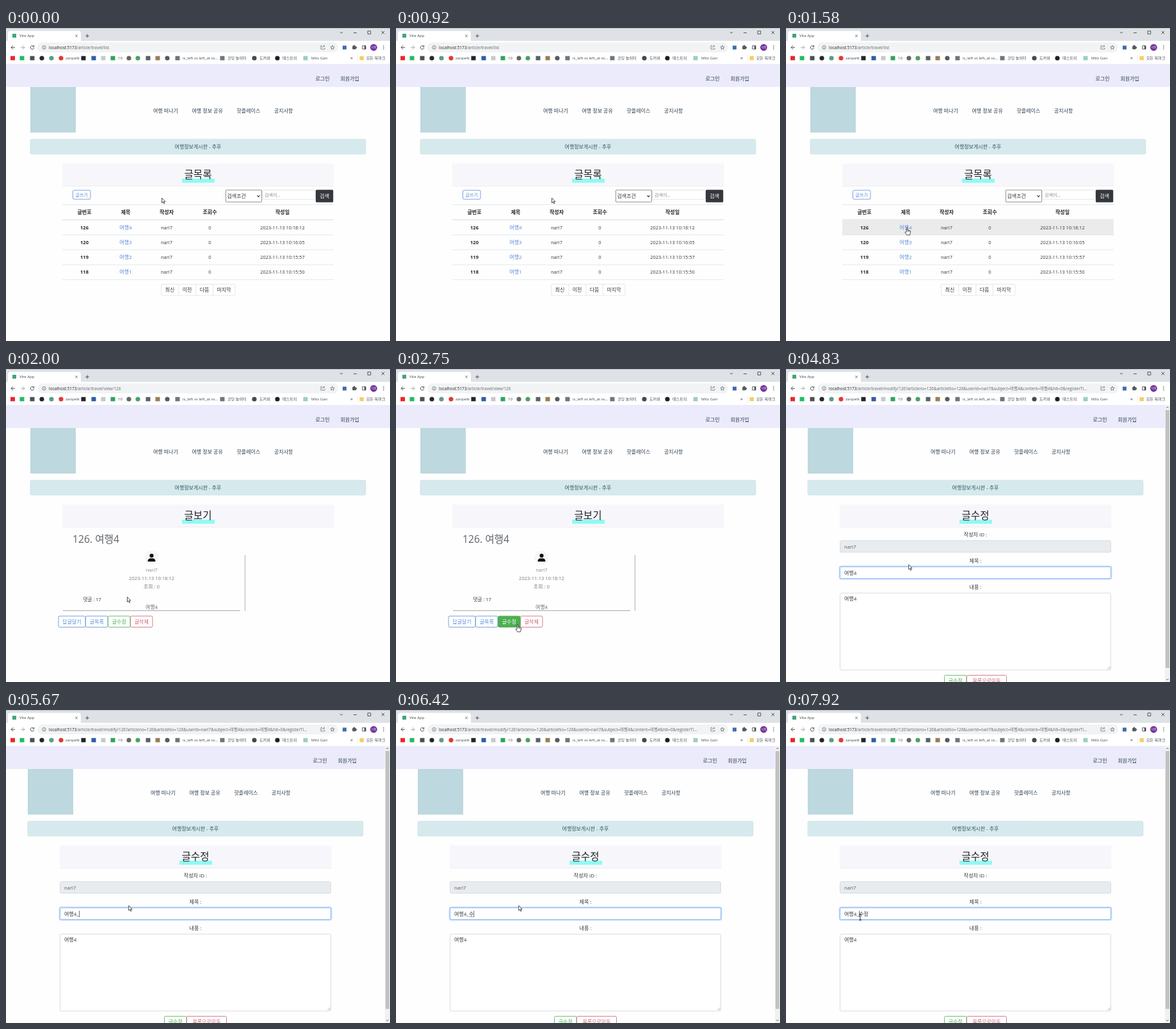
Write an HTML page with a canvas that moves like this. It is 600 by 488 pixels and loops after 8000 ms.

```html
<!DOCTYPE html>
<html lang="ko">
<head>
<meta charset="utf-8">
<title>Vite App</title>
<style>
html, body { margin: 0; width: 100%; height: 100%; overflow: hidden; background: #fff; }
canvas { display: block; width: 600px; height: 488px; }
</style>
</head>
<body>
<canvas id="stage"></canvas>
<script>
const W = 600, H = 488, LOOP = 8000;
const FONT = '"Open Sans", "Noto Sans CJK KR", "Noto Sans CJK", "Noto Sans CJK JP", sans-serif';
const USER = 'nari7', INK = '#34383e', LINE = '#dee2e6';
const BLUE = '#5b8bd6', GREEN = '#4caf50', RED = '#cc6070';

const VIEW_AT = 1670, EDIT_AT = 2920, FOCUS_AT = 4330, CARET_AT = 7920;

// time, x, y of the pointer's hot spot
const PATH = [
  [0, 243.5, 265], [920, 243.5, 265], [1500, 189, 311], [1750, 189, 311],
  [2250, 190, 398], [2920, 190, 398], [3500, 198, 298], [3750, 198, 298],
  [4170, 188, 316], [4330, 188, 316], [4580, 191.7, 305], [6900, 191.7, 305],
  [7500, 124, 326], [7670, 122, 328], [7900, 122, 328], [7915, 116, 323], [8000, 116, 323]
];
const TYPED = [[0, '여행4'], [5330, '여행4_'], [6170, '여행4_ㅅ'], [6250, '여행4_수'],
  [6500, '여행4_숮'], [6580, '여행4_수정']];

const canvas = document.getElementById('stage');
const c = canvas.getContext('2d');
const dpr = window.devicePixelRatio || 1;
canvas.width = W * dpr;
canvas.height = H * dpr;

function text(s, x, y, size = 8, color = INK, align = 'center', weight = 400) {
  c.font = `${weight} ${size}px ${FONT}`;
  c.textAlign = align;
  c.fillStyle = color;
  c.fillText(s, x, y + size * 0.36);
}
const left = (s, x, y, size, color, weight) => text(s, x, y, size, color, 'left', weight);

function rect(x, y, w, h, color) {
  c.fillStyle = color;
  c.fillRect(x, y, w, h);
}

function box(x, y, w, h, r, fill, stroke, lw = 0.8) {
  c.beginPath();
  c.roundRect(x, y, w, h, r);
  if (fill) { c.fillStyle = fill; c.fill(); }
  if (stroke) { c.strokeStyle = stroke; c.lineWidth = lw; c.stroke(); }
}

function dot(x, y, r, color) {
  c.beginPath();
  c.arc(x, y, r, 0, Math.PI * 2);
  c.fillStyle = color;
  c.fill();
}

function stroke(d, color = '#50545a', lw = 1, x = 0, y = 0) {
  c.save();
  c.translate(x, y);
  c.strokeStyle = color;
  c.lineWidth = lw;
  c.stroke(new Path2D(d));
  c.restore();
}

function button(s, x, y, w, h, color, filled, size = 8) {
  box(x + 0.5, y + 0.5, w - 1, h - 1, 2, filled ? color : '#fff', color, 0.8);
  text(s, x + w / 2, y + h / 2, size, filled ? '#fff' : color);
}

function tabStrip() {
  rect(0, 0, W, 21, '#dee1e6');
  rect(0, 0, W, 0.7, '#b4b7bb');
  box(3, 4.5, 114, 20, [4, 4, 0, 0], '#fff');
  rect(10, 9, 6, 6, '#41a57d');
  left('Vite App', 21, 12.3, 6, '#45484d');
  stroke('M-1.8-1.8L1.8 1.8M1.8-1.8L-1.8 1.8', '#55585c', 0.8, 110, 12.3);
  stroke('M-2.8 0H2.8M0-2.8V2.8', '#45484d', 0.9, 127, 12.3);
  stroke('M-2.2-1L0 1.2L2.2-1', '#333', 0.8, 524, 7);
  stroke('M-2.5 0H2.5', '#333', 0.8, 545.5, 7.5);
  stroke('M-2.3-2.3H2.3V2.3H-2.3Z', '#333', 0.8, 567.5, 7);
  stroke('M-2.3-2.3L2.3 2.3M2.3-2.3L-2.3 2.3', '#333', 0.8, 589, 7);
}

function toolbar(path) {
  rect(0, 20, W, 36, '#fff');
  stroke('M3 0H-3M0-3L-3 0L0 3', '#4d5156', 1, 11, 30.3);
  stroke('M-3 0H3M0-3L3 0L0 3', '#a5a8ac', 1, 26, 30.3);
  stroke('M2-2A2.8 2.8 0 1 0 2.8 .7M2.8-3.2V-1H.5', '#4d5156', 1, 41, 30.3);
  box(49, 22.5, 470, 15.5, 7.75, '#f1f3f4');
  stroke('M2.8 0A2.8 2.8 0 1 1-2.8 0A2.8 2.8 0 1 1 2.8 0M0-.4V1.6M0-1.7V-1', '#55595e', 0.7, 59.5, 30.3);

  c.save();
  c.beginPath();
  c.rect(60, 22, 422, 16);
  c.clip();
  const host = 'localhost:5173';
  left(host, 67, 30.3, 6.45, '#25282c');
  left(path, 67 + c.measureText(host).width, 30.3, 6.45, '#63676c');
  c.restore();

  stroke('M-1-2.5H-3V3H3V1M-1 .8C-1-1 0-1.8 3-1.8M1.2-3.4L3-1.8L1.2-.2', '#63676c', 0.7, 495, 30);
  stroke('M0-3.2L.9-1L3.2-.9L1.4 .6L2 2.9L0 1.6L-2 2.9L-1.4 .6L-3.2-.9L-.9-1Z', '#55595e', 0.7, 510, 30.3);
  rect(526, 27.5, 6, 6, '#416cb0');
  box(541.2, 28, 5.6, 5.2, 1, '#55595e');
  dot(544, 27.7, 1.3, '#55595e');
  dot(547, 30.6, 1.3, '#55595e');
  stroke('M-2.6-2.6H2.6V2.6H-2.6Z', '#45484d', 0.9, 559.5, 30.3);
  rect(560, 28, 2, 5, '#45484d');
  dot(574.5, 30.3, 5.4, '#74349d');
  text('나래', 574.5, 30.3, 4, '#eee');
  for (const y of [27.8, 30.3, 32.8]) dot(590, y, 0.7, '#45484d');
}

function bookmarks() {
  const icons = [
    [10.5, '#e8282b'], [25, '#20bd62'], [41, '#4b5055'], [56, '#23272b', 1], [71, '#5c9c84', 1],
    [86, '#e03a33', 1], [121, '#22252a'], [137, '#2f5da8'], [152, '#c6c9cc'], [167, '#2fa45a'],
    [192, '#666', 1], [206, '#4aa263', 1], [222, '#5a6068'], [237, '#9a7d55'], [252, '#555b62', 1],
    [268, '#70757c'], [338, '#70757c'], [388, '#44494e', 1], [424, '#1e2023', 1], [468, '#9ccfc2']
  ];
  for (const [x, color, round] of icons) {
    if (round) dot(x, 47, 3.6, color);
    else rect(x - 3.5, 43.7, 7, 6.6, color);
  }
  const labels = [['zanpelk', 93], ['10', 175], ['is_left vs left_at vs...', 276], ['코딩 놀이터', 346],
    ['도커와', 396], ['테스트의', 432], ['Milo Gan', 477], ['모든 북마크', 563]];
  for (const [s, x] of labels) left(s, x, 47, 6.1, '#44484e');
  text('»', 540, 46.5, 8);
  rect(552.5, 44, 6.5, 6.2, '#f3cf69');
  rect(549, 42, 0.5, 10, '#d7dadd');
}

function siteHead(dx, title) {
  rect(0, 55, W, 37, '#ebebfc');
  rect(0, 55, W, 0.6, '#dfe1e8');
  c.save();
  c.translate(dx, 0);
  const navy = '#2b3d50';
  left('로그인', 483.5, 79.3, 8, navy);
  left('회원가입', 522.5, 79.3, 8, navy);
  rect(38, 92, 71, 71, '#bdd8de');
  left('여행 떠나기', 230, 129, 8, navy);
  left('여행 정보 공유', 290.5, 129, 8, navy);
  left('핫플레이스', 360.5, 129, 8, navy);
  left('공지사항', 419, 129, 8, navy);
  box(38, 173.4, 524, 23.2, 2, '#d6eaed', '#c9e1e5', 0.7);
  text('여행정보게시판 - 추후', 300, 185, 8, '#315760');
  rect(88, 211.5, 424.5, 35.5, '#f7f7fb');
  rect(88, 246, 424.5, 0.7, '#ebebef');
  rect(275, 235, 51, 6.3, '#8efbf2');
  text(title, 300, 228.3, 15.6, '#202327');
  c.restore();
}

function listPage(p) {
  siteHead(0, '글목록');
  button('글쓰기', 104, 252.5, 28.5, 15, BLUE, false, 7);
  box(343.5, 252.7, 56, 18.5, 0.5, '#fff', '#75787c', 0.8);
  left('검색조건', 345.5, 262.3, 8);
  stroke('M-2-1L0 1.2L2-1', '#222', 1.1, 394.5, 262);
  box(400.5, 252.7, 83, 14.5, 1, '#fff', '#d5d9de', 0.7);
  left('검색어...', 404, 260, 7, '#8a8e93');
  box(484, 252.3, 27.3, 19.4, 1.5, '#34373b');
  text('검색', 497.7, 262.3, 8, '#fff');

  const cols = [122.5, 187, 251, 318.5, 432];
  rect(88, 275, 424, 0.8, LINE);
  ['글번호', '제목', '작성자', '조회수', '작성일'].forEach((s, i) => text(s, cols[i], 287, 8, '#25282c', 'center', 700));
  rect(88, 298.5, 424, 0.9, '#cfd3d7');

  const rows = [[126, 4, '18:12'], [120, 3, '16:05'], [119, 2, '15:57'], [118, 1, '15:50']];
  rows.forEach(([no, n, time], i) => {
    const y = 311 + i * 23.2;
    if (Math.abs(p.y - y) < 11.5) rect(88, y - 11.6, 424, 23.2, '#ebebec');
    text(no, cols[0], y, 7.5, '#25282c', 'center', 700);
    text('여행' + n, cols[1], y, 8, BLUE);
    text(USER, cols[2], y, 7.5);
    text('0', cols[3], y, 7.5);
    text('2023-11-13 10:' + time, cols[4], y, 7.35);
    rect(88, y + 11.3, 424, 0.8, LINE);
  });

  box(242.5, 399.5, 115.5, 17.5, 1.5, '#fff', LINE, 0.8);
  for (const x of [269.5, 296.5, 323]) rect(x, 399.5, 0.8, 17.5, LINE);
  [['최신', 256], ['이전', 283], ['다음', 310], ['마지막', 340.5]].forEach(([s, x]) => text(s, x, 408.5, 8));
}

function viewPage(p) {
  siteHead(0, '글보기');
  left('126. 여행4', 104, 265.5, 15.7, '#5e646b');
  dot(227.5, 294, 11, '#f7f7f9');
  dot(227.5, 291, 3.1, '#111');
  box(221.5, 295.3, 12, 5, [5, 5, 1, 1], '#111');
  text(USER, 227.5, 313, 7.5, '#85898e');
  text('2023-11-13 10:18:12', 227.5, 326, 7.5, '#75797f');
  text('조회 : 0', 227.5, 339, 7.8, '#75797f');
  left('댓글 : 17', 120.5, 359.5, 7.5);
  text('여행4', 227.5, 370.7, 7.8, '#62666c');
  rect(373, 290, 0.9, 87, '#aaa');
  rect(89, 376.3, 277, 0.9, '#999');

  const over = p.y > 385 && p.y < 403 && p.x > 159 && p.x < 194;
  button('답글달기', 81.5, 384.7, 43, 18.3, BLUE);
  button('글목록', 124, 384.7, 35.5, 18.3, BLUE);
  button('글삭제', 194, 384.7, 35.5, 18.3, RED);
  button('글수정', 159, 384.7, 35.5, 18.3, GREEN, over);
}

function editPage(t) {
  siteHead(-4, '글수정');
  text('작성자 ID :', 296, 258.5, 8);
  box(84.5, 267.7, 423, 18, 2, '#e9ecef', '#ced4da');
  left(USER, 91, 277, 7.6, '#555a60');
  text('제목 :', 296, 299, 8);

  const focused = t >= FOCUS_AT;
  if (focused) box(84, 308, 424, 19, 2.5, '#fff', '#c3dafd', 3);
  box(84.5, 308.5, 423, 18, 2, '#fff', focused ? '#86b2f0' : '#ced4da');
  const title = TYPED.filter(([at]) => at <= t).pop()[1];
  left(title, 91, 318, 8);
  if (focused) {
    const before = t >= CARET_AT ? '여행4_' : title;
    const x = 91 + c.measureText(before).width;
    const composing = t >= 6170 && t < 7000;
    const shown = composing || t >= CARET_AT || Math.floor((t - FOCUS_AT) / 500) % 2 === 0;
    if (shown) rect(x + 0.2, 313, 0.7, 10, '#333');
    if (composing) rect(x - 7, 322.3, 7, 0.6, '#777');
  }

  text('내용 :', 296, 340, 8);
  box(84.5, 349.3, 423, 120, 2, '#fff', '#ced4da');
  left('여행4', 91, 358.3, 8);
  stroke('M502.5 468L506.5 464M505 468L506.5 466.5', '#777', 0.6);
  button('글수정', 247, 477, 35.5, 18.5, GREEN);
  button('목록으로이동', 282, 477, 63, 18.5, RED);

  rect(592, 55, 8, 433, '#f1f1f1');
  rect(593, 64, 6, 402, '#c1c1c1');
  stroke('M-1.6 .8L0-.8L1.6 .8', '#555', 1, 596, 60);
  stroke('M-1.6-.8L0 .8L1.6-.8', '#555', 1, 596, 484);
}

function pointerAt(t) {
  let i = 0;
  while (i < PATH.length - 2 && PATH[i + 1][0] <= t) i++;
  const [t0, x0, y0] = PATH[i], [t1, x1, y1] = PATH[i + 1];
  const u = Math.min(1, (t - t0) / (t1 - t0)), k = u * u * (3 - 2 * u);
  return { x: x0 + (x1 - x0) * k, y: y0 + (y1 - y0) * k };
}

const ARROW = new Path2D('M0 0V7.6L1.8 6L3.1 8.8L4.3 8.2L3.1 5.5H5.3Z');
const HAND = new Path2D('M-.9 .5Q0-.6 .9 .5V4L4.8 5Q5.8 5.4 5.5 7L4.5 11.8H-.3L-3 7.6Q-2.6 6.2-.9 7.4Z');

function pointer(p, kind) {
  if (kind === 'beam') {
    stroke('M-2-4.5H2M0-4.5V4.5M-2 4.5H2', '#222', 0.9, p.x, p.y);
    return;
  }
  const shape = kind === 'hand' ? HAND : ARROW;
  c.save();
  c.translate(p.x, p.y);
  c.fillStyle = '#fff';
  c.strokeStyle = '#222';
  c.lineWidth = 0.8;
  c.fill(shape);
  c.stroke(shape);
  if (kind === 'hand') stroke('M1 4V7M2.6 4.6V7M4.1 5V7', '#222', 0.5);
  c.restore();
}

function pointerKind(t, p) {
  const inX = (a, b) => p.x > a && p.x < b, inY = (a, b) => p.y > a && p.y < b;
  if (t < VIEW_AT) return inX(177, 197) && inY(305, 317) ? 'hand' : 'arrow';
  if (t < EDIT_AT) return inX(82, 229) && inY(385, 403) ? 'hand' : 'arrow';
  return inX(84, 508) && (inY(308, 328.5) || inY(349, 469)) ? 'beam' : 'arrow';
}

function draw(now) {
  const t = Math.floor(((now % LOOP) + 5) * 0.012) / 0.012 % LOOP + 4;
  const p = pointerAt(t);
  c.setTransform(dpr, 0, 0, dpr, 0, 0);
  rect(0, 0, W, H, '#fefefe');
  let path = '/article/travel/list';
  if (t >= EDIT_AT) {
    path = `/article/travel/modify/126?articleno=126&articleNo=126&userId=${USER}&subject=여행4&content=여행4&hit=0&registerTi...`;
    editPage(t);
  } else if (t >= VIEW_AT) {
    path = '/article/travel/view/126';
    viewPage(p);
  } else {
    listPage(p);
  }
  tabStrip();
  toolbar(path);
  bookmarks();
  pointer(p, pointerKind(t, p));
}

function tick() {
  draw(performance.now());
  requestAnimationFrame(tick);
}
tick();
</script>
</body>
</html>
```
